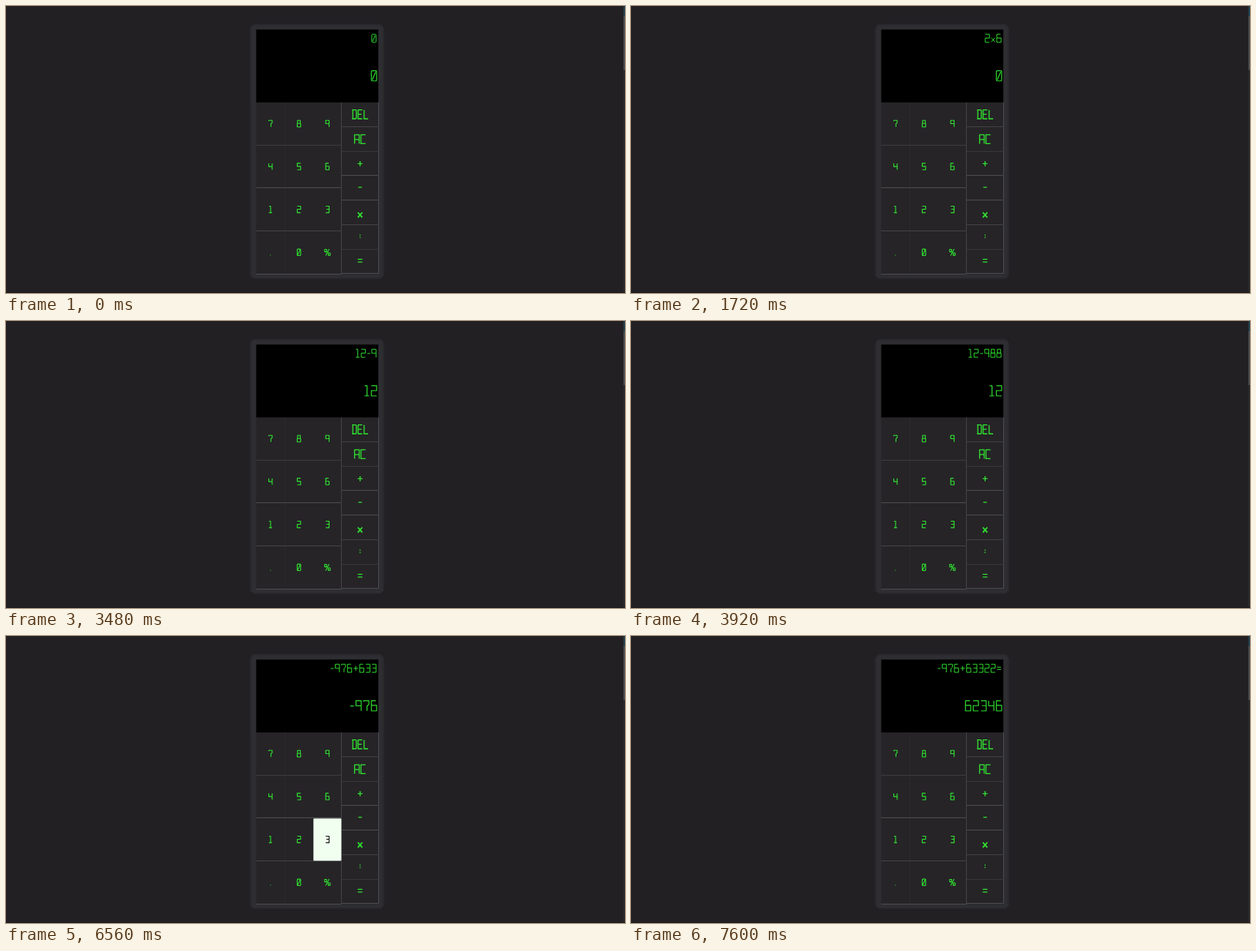
Recreate the animation shown at these times as an HTML page. Size 800 by 372 pixels, loop 9.68 s.

```html
<!DOCTYPE html>
<html lang="en">
<head>
<meta charset="utf-8">
<title>Calculator</title>
<style>
  html, body { margin: 0; width: 100%; height: 100%; overflow: hidden; background: #222023; }
  svg { display: block; width: 100vw; height: 100vh; }
  .ink { fill: none; stroke-linejoin: round; }
  .ink path { vector-effect: non-scaling-stroke; }
</style>
</head>
<body>
<svg id="stage" viewBox="0 0 800 372" preserveAspectRatio="none">
  <defs>
    <filter id="soft" x="-10%" y="-10%" width="120%" height="120%">
      <feGaussianBlur stdDeviation="1.3"/>
    </filter>
  </defs>
  <rect width="800" height="372" fill="#222023"/>
  <rect x="797.5" width="2.5" height="372" fill="#29282b"/>
  <rect x="798" width="2" height="13" fill="#21404f"/>
  <rect x="798" y="13" width="2" height="70" fill="#4d4d50"/>
  <rect y="371" width="800" height="1" fill="#1c1a1d"/>
  <rect x="316" y="24" width="172" height="329.5" rx="6" fill="#2f2e31" filter="url(#soft)"/>
  <rect x="323.4" y="30.5" width="157.8" height="94.7" fill="#000"/>
  <g id="keys"></g>
  <g id="line"></g>
  <g id="total"></g>
</svg>
<script>
const LOOP = 9680;
const GREEN = '#30e230';
const DARK = '#101510';
const TALL = 1.07; // the letters are slightly taller than drawn

// Stroke font: character -> [ink width, advance, path], 9.6 units tall
const GLYPHS = {
  0: [5.3, 7.8, 'M0 .6L.6 0H4.7L5.3 .6V9L4.7 9.6H.6L0 9ZM1 8.4L4.3 1.2'],
  1: [4.8, 7, 'M.2 0H2.6V9.6M0 9.6H4.8'],
  2: [5.3, 7.8, 'M0 0H5.3V4.6H0V9.6H5.3'],
  3: [5.3, 7.8, 'M0 0H5.3V9.6H0M1 4.6H5.3'],
  4: [5.3, 7.8, 'M0 0V4.8H5.3M5.3 0V9.6'],
  5: [5.3, 7.8, 'M5.3 0H0V4.6H5.3V9.6H0'],
  6: [5.3, 7.8, 'M4.5 0H0V9.6H5.3V4.4H0'],
  7: [5.3, 7.8, 'M0 1V0H5.3V3.4L3.4 5V9.6'],
  8: [5.3, 7.8, 'M.5 0H4.8V4.5H.5ZM0 4.5H5.3V9.6H0Z'],
  9: [5.3, 7.8, 'M5.3 9.6V0H0V4.8H5.3'],
  '.': [1.2, 3, 'M0 9H1.2'],
  '%': [8.6, 10, 'M0 .4H3V4H0ZM5.6 5.6H8.6V9.2H5.6ZM7 0L1.6 9.6'],
  '+': [5.6, 7.8, 'M0 4.8H5.6M2.8 2V7.6'],
  '-': [3.8, 5.8, 'M0 5H3.8'],
  'x': [4.6, 7, 'M0 4.2L4.6 9.2M4.6 4.2L0 9.2'],
  ':': [1.2, 3, 'M0 3.2H1.2M0 6H1.2'],
  '=': [5, 7, 'M0 3.4H5M0 6.2H5'],
  D: [5, 7, 'M0 0H4.2L5 .8V8.8L4.2 9.6H0M.9 0V9.6'],
  E: [4.8, 6.9, 'M4.8 0H0V9.6H4.8M0 4.7H4'],
  L: [4.6, 6, 'M0 0V9.6H4.6'],
  A: [5.3, 7.3, 'M0 9.6V0H5.3V9.6M0 5.2H5.3'],
  C: [5.3, 7, 'M5.3 0H0V9.6H5.3']
};

const $ = id => document.getElementById(id);

// align: 0.5 centres the text on x, 1 ends it there
function write(str, x, y, size, align, color, weight) {
  let pos = 0, ink = 0, marks = '';
  for (const ch of str) {
    const [width, advance, d] = GLYPHS[ch];
    marks += `<path transform="translate(${pos} 0)" d="${d}"/>`;
    ink = pos + width;
    pos += advance;
  }
  const left = x - ink * size * align;
  return `<g class="ink" role="img" aria-label="${str}" stroke="${color}" stroke-width="${weight}"
    transform="translate(${left} ${y}) scale(${size} ${size * TALL})">${marks}</g>`;
}

const keys = [];
['789', '456', '123', '.0%'].forEach((row, r) => [...row].forEach((label, c) =>
  keys.push({ label, x: 323.4 + c * 36.8, y: 125 + r * 55.6, w: 36.8, h: 55.6, size: .82, weight: 1.1, dy: -.3 })));

const STYLES = {
  DEL: { size: 1.12, dy: -.4 }, AC: { size: 1.12 },
  '+': { size: 1.1 }, '-': { size: 1.2, dy: -1.4 },
  x: { size: 1.25, weight: 1.8, dy: 2.8 },
  ':': { weight: 1.4, dy: -.9 }, '=': { size: 1.2, dy: -1.2 }
};
['DEL', 'AC', '+', '-', 'x', ':', '='].forEach((label, i) =>
  keys.push({ label, x: 433.8, y: 125 + i * 31.75, w: 47.6, h: 31.75, size: 1, weight: 1.3, dy: 0, ...STYLES[label] }));

function drawKey({ label, x, y, w, h, size, weight, dy }, down) {
  const right = Math.floor(x + w) + .5, bottom = Math.floor(y + h - .4) + .5;
  const face = down
    ? `<rect x="${x + .4}" y="${y + .3}" width="${w - .6}" height="${h - .5}" rx="1" fill="#f0fff0"/>`
    : `<rect x="${x}" y="${y}" width="${w}" height="${h}" fill="#262427"/>
       <path d="M${x} ${bottom}H${right}V${y}" fill="none" stroke="#4c4b4e"/>`;
  const top = y + h / 2 - 4.8 * TALL * size + dy - (label === 'x' ? 1.9 * size : 0);
  return face + write(label, x + w / 2, top, size, .5, down ? DARK : GREEN, weight);
}

// Key presses: [down, up, label]
const PRESSES = [
  [960, 1040, '2'], [1320, 1480, 'x'], [1680, 1720, '6'], [2120, 2200, '='],
  [2920, 3000, '-'], [3440, 3480, '9'], [3680, 3760, '8'], [3840, 3920, '8'], [4440, 4520, '='],
  [5920, 6000, '+'], [6240, 6320, '6'], [6400, 6480, '3'], [6560, 6640, '3'],
  [6720, 6800, '2'], [6880, 6920, '2'], [7520, 7600, '=']
];

function solve(line) {
  const [, a, op, b] = line.match(/^(-?\d+)(.)(\d+)$/);
  return String({ '+': +a + +b, '-': a - b, x: a * b }[op]);
}

function stateAt(t) {
  let line = '0', total = '0', held = '';
  for (const [down, up, label] of PRESSES) {
    if (t < down) break;
    if (t < up) held = label;
    if (label === '=') total = solve(line);
    if (line === '0') line = label;
    else line = (line.endsWith('=') ? total : line) + label;
  }
  return { line, total, held };
}

let shown = '';
function render(t) {
  const { line, total, held } = stateAt(t);
  const id = [line, total, held].join('|');
  if (id === shown) return;
  shown = id;
  $('keys').innerHTML = keys.map(k => drawKey(k, k.label === held)).join('');
  $('line').innerHTML = write(line, 478.2, 36.7, 1.01, 1, GREEN, .95);
  $('total').innerHTML = write(total, 479, 83.9, 1.28, 1, GREEN, 1.15);
}

const start = performance.now();
function tick() {
  render((performance.now() - start) % LOOP);
  requestAnimationFrame(tick);
}
tick();
</script>
</body>
</html>
```
